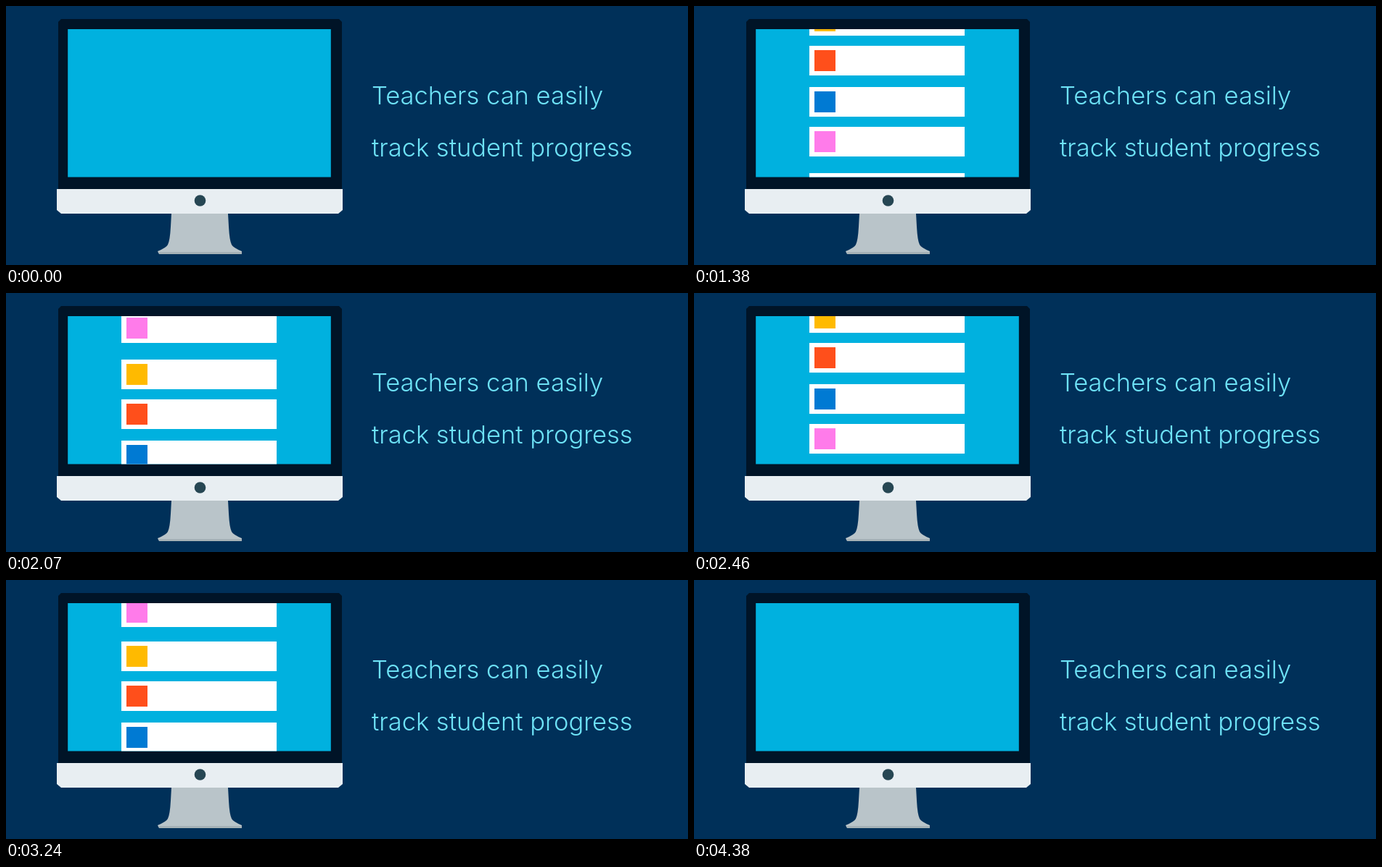
Write an HTML page that moves like this. It is 940x358 px and loops after 4650 ms.

```html
<!DOCTYPE html>
<html lang="en">
<head>
<meta charset="utf-8">
<title>Student progress</title>
<style>
  html, body { margin: 0; width: 100%; height: 100%; overflow: hidden; background: #003059; }
  svg { display: block; width: 940px; height: 358px; }
  text { font: 300 34.5px Inter, "Open Sans", sans-serif; fill: #6ee3f7; }
</style>
</head>
<body>
<svg viewBox="0 0 940 358">
  <defs>
    <clipPath id="screen"><rect x="85" y="32" width="363" height="204.5"/></clipPath>
  </defs>
  <path fill="#b9c4c9" d="M228 287H306L307 305Q308 324 311 330Q313 334 325 339V343H211L209 339Q221 334 223 330Q226 324 227 305Z"/>
  <rect x="211" y="340" width="114" height="3" fill="#a5b1b6"/>
  <path fill="#001427" d="M72 253V22L76 18H459L463 22V253Z"/>
  <path fill="#e8eef2" d="M70 253H464V282L458 287H76L70 282Z"/>
  <circle cx="267.5" cy="269" r="7.8" fill="#264653"/>
  <rect x="85.2" y="32" width="362.6" height="204.5" fill="#00b1df"/>
  <g clip-path="url(#screen)"><g id="list" shape-rendering="crispEdges"></g></g>
  <text x="504" y="136">Teachers can easily</text>
  <text x="504" y="208">track student progress</text>
</svg>
<script>
  const LOOP = 4650, STEP = 30, START = 210, END = 4380;
  const SPEED = 145 / 24; // pixels per step
  const groupTops = [0, 231, 459];
  const rows = [[0, '#ffba00'], [55, '#ff4f1b'], [112, '#007ad3'], [167, '#ff7bea']];
  const list = document.getElementById('list');

  function addRect(x, y, width, height, fill) {
    const rect = document.createElementNS('http://www.w3.org/2000/svg', 'rect');
    for (const [name, value] of Object.entries({ x, y, width, height, fill })) {
      rect.setAttribute(name, value);
    }
    list.append(rect);
  }

  for (const top of groupTops) {
    for (const [offset, color] of rows) {
      addRect(159, top + offset, 214, 41, '#fff');
      addRect(166, top + offset + 6, 29, 29, color);
    }
  }

  function draw(ms) {
    const t = ms % LOOP;
    const visible = t >= START && t < END;
    const step = Math.floor((t - START) / STEP);
    list.setAttribute('visibility', visible ? 'visible' : 'hidden');
    list.setAttribute('transform', `translate(0 ${Math.round(236 - SPEED * step)})`);
  }

  const begin = performance.now();
  function tick() {
    draw(performance.now() - begin);
    requestAnimationFrame(tick);
  }
  draw(0);
  requestAnimationFrame(tick);
</script>
</body>
</html>
```
